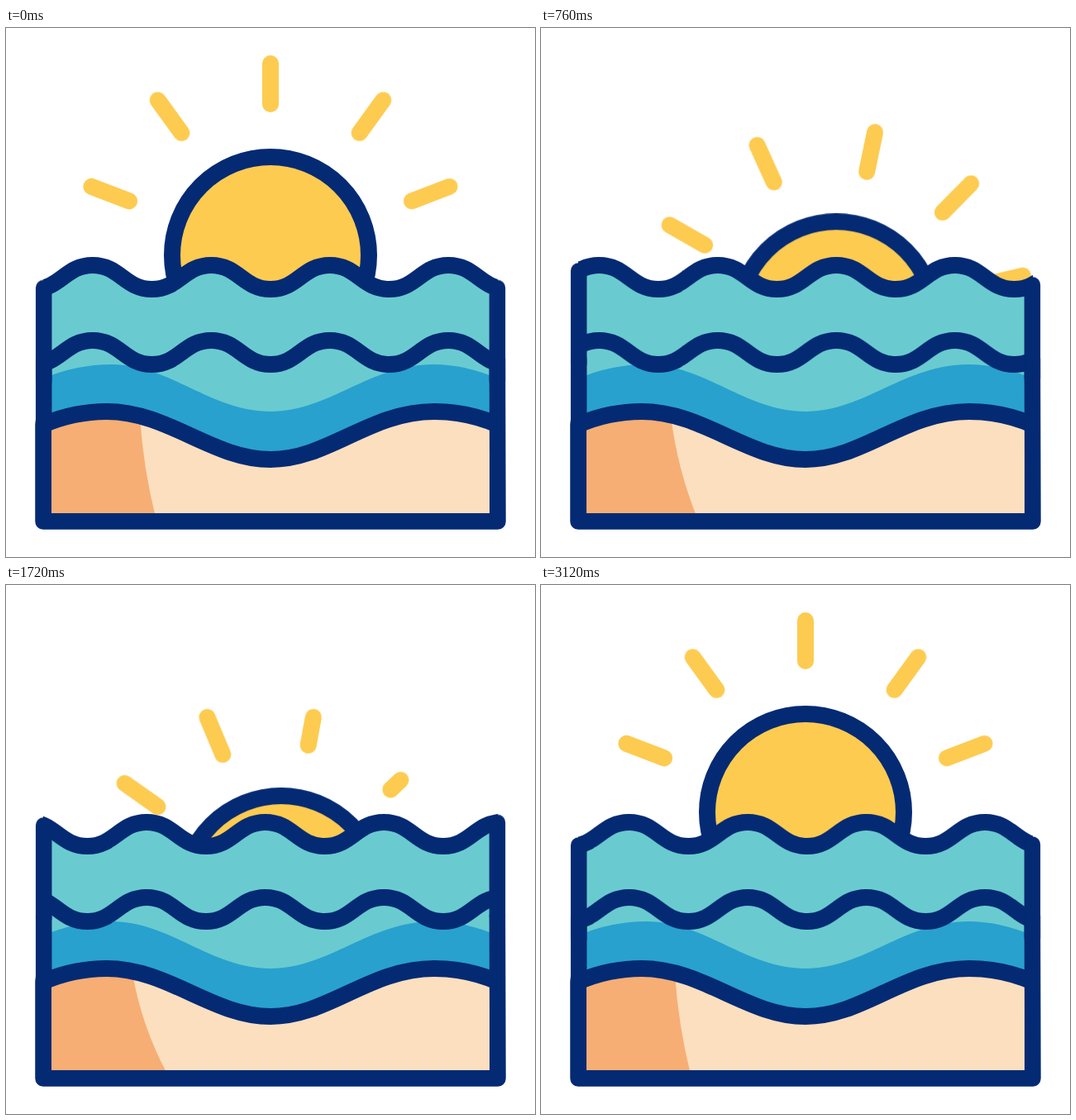
An HTML page without scripts that plays this animation: 640x640 px, repeating every 3.16 s.

```html
<!DOCTYPE html>
<html lang="en">
<head>
<meta charset="utf-8">
<title>Sun over the sea</title>
<style>
  html, body { margin: 0; width: 100%; height: 100%; overflow: hidden; background: #fff; }
  svg { display: block; width: 100vw; height: 100vh; }

  .line { fill: none; stroke: #042a74; stroke-width: 20; stroke-linecap: round; stroke-linejoin: round; }
  .line.sun { fill: #fdcb50; }
  .line.water { fill: #69cbd0; }
  .line.frame { stroke-width: 19.5; }

  .flow, .post, .drift, .dip, .spin, .ray, .shade { animation: 3.16s linear infinite; }

  /* Waves slide left by one wavelength; the posts ride the same curve. */
  .flow { animation-name: flow; }
  .post { animation-name: bob; animation-timing-function: cubic-bezier(.46, 0, .54, 1); }
  .left { animation-delay: -1.854s; }
  .right { animation-delay: -1.304s; }
  @keyframes flow { to { transform: translateX(-143.5px); } }
  @keyframes bob { 50% { transform: translateY(29px); } }

  /* Sun: small hop, dive, then a straight rise. */
  .drift { animation-name: drift; }
  .dip { animation-name: dip; }
  .spin { animation-name: spin; }
  @keyframes drift {
    0% { transform: translateX(0); animation-timing-function: cubic-bezier(.5, 0, .6, .9); }
    34.177% { transform: translateX(50px); animation-timing-function: cubic-bezier(.5, 0, .43, 1); }
    68%, 100% { transform: translateX(0); }
  }
  @keyframes dip {
    0% { transform: translateY(0); animation-timing-function: cubic-bezier(.3333, 0, .6667, -.3333); }
    34.177% { transform: translateY(385px); animation-timing-function: cubic-bezier(.5, 0, .43, 1); }
    68%, 100% { transform: translateY(0); }
  }
  @keyframes spin {
    0% { transform: rotate(0deg); animation-timing-function: cubic-bezier(.36, 0, .62, 1); }
    34.177% { transform: rotate(180deg); animation-timing-function: cubic-bezier(.46, 0, .4, 1); }
    69.3%, 100% { transform: rotate(0deg); }
  }

  .ray {
    fill: none; stroke: #fdcb50; stroke-width: 20; stroke-linecap: round;
    stroke-dasharray: 1.01 2;
    animation-name: grow;
    animation-delay: calc(var(--n, 0) * .1s - 3.16s);
  }
  @keyframes grow {
    0%, 32.3% { stroke-dashoffset: 0; }
    32.31%, 45.09% { stroke-dashoffset: 1.2; }
    45.1% { stroke-dashoffset: 1.01; }
    53.95%, 100% { stroke-dashoffset: 0; }
  }

  .shade { fill: #f6ae74; animation-name: shade; }
  @keyframes shade {
    0% {
      d: path("M45 480L122 464L162 470Q166 532 181 592L45 592Z");
      animation-timing-function: cubic-bezier(.3333, 0, .6667, 0);
    }
    34.177% {
      d: path("M45 480L122 464L148 468Q162 532 203 592L45 592Z");
      animation-timing-function: cubic-bezier(.3333, 0, .6667, .3333);
    }
    68.354%, 100% { d: path("M45 480L122 464L162 470Q166 532 181 592L45 592Z"); }
  }
</style>
</head>
<body>
<svg viewBox="0 0 640 640">
  <defs>
    <clipPath id="sky"><rect width="640" height="310"/></clipPath>
    <clipPath id="box"><rect x="45.5" y="200" width="549" height="397"/></clipPath>
    <path id="wave" d="M-38.7 287c33 0 38.75 29 71.75 29
      s38.75-29 71.75-29 38.75 29 71.75 29 38.75-29 71.75-29 38.75 29 71.75 29
      38.75-29 71.75-29 38.75 29 71.75 29 38.75-29 71.75-29 38.75 29 71.75 29
      38.75-29 71.75-29 38.75 29 71.75 29 38.75-29 71.75-29V660H-38.7Z"/>
    <path id="bed" d="M45 480Q82 464 122 464C196 464 250 522 320 522C390 522 440 464 518 464Q558 464 595 480V597H45Z"/>
    <path id="beam" d="M0-183V-232" pathLength="1"/>
  </defs>

  <g clip-path="url(#sky)">
    <g transform="translate(320 275)">
      <g class="drift"><g class="dip">
        <circle r="119" class="line sun"/>
        <g class="spin">
          <use href="#beam" class="ray" style="--n:4" transform="rotate(69)"/>
          <use href="#beam" class="ray" style="--n:3" transform="rotate(36)"/>
          <use href="#beam" class="ray" style="--n:2"/>
          <use href="#beam" class="ray" style="--n:1" transform="rotate(-36)"/>
          <use href="#beam" class="ray" transform="rotate(-69)"/>
          <use href="#beam" class="ray" transform="rotate(-101)"/>
          <use href="#beam" class="ray" transform="rotate(-134)"/>
          <use href="#beam" class="ray" transform="rotate(-170)"/>
          <use href="#beam" class="ray" transform="rotate(-206)"/>
        </g>
      </g></g>
    </g>
  </g>

  <g clip-path="url(#box)">
    <g class="flow"><use href="#wave" class="line water"/></g>
    <path fill="#28a1ce" d="M45 424Q85 407 128 407C198 407 248 464 320 464C391 464 440 407 517 407Q555 407 595 424V597H45Z"/>
    <g class="flow"><use href="#wave" y="91" class="line"/></g>
    <use href="#bed" fill="#fcdfbe"/>
    <path class="shade" d="M45 480L122 464L162 470Q166 532 181 592L45 592Z"/>
    <use href="#bed" class="line"/>
  </g>

  <path class="line frame" d="M45.7 400V474L45 480V597H595L594.4 400"/>
  <path class="line frame post left" d="M45.7 287V400"/>
  <path class="line frame post right" d="M594.4 287V400"/>
</svg>
</body>
</html>
```
